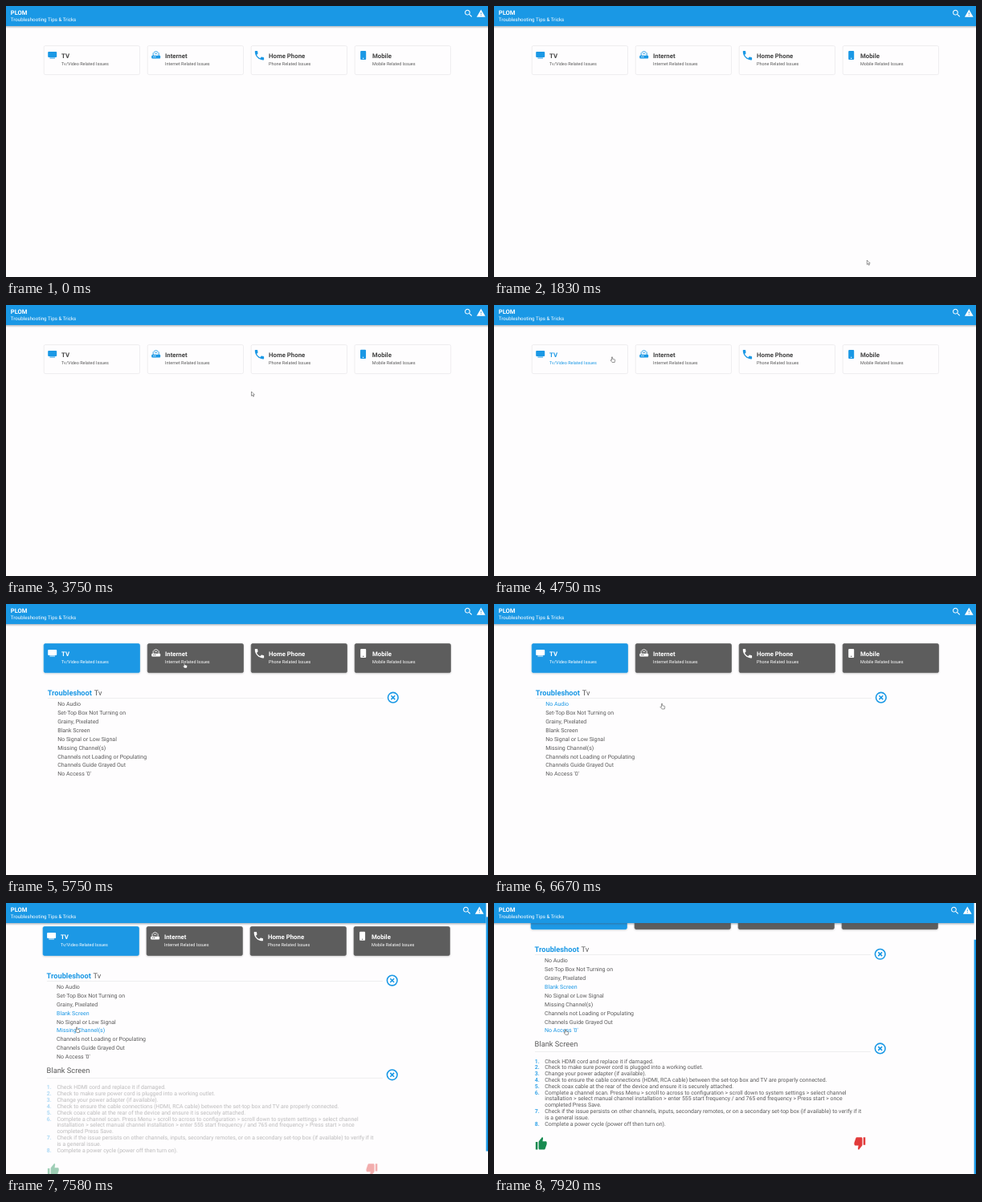
Write an HTML page that moves like this. It is 600 px wide and 338 px high and loops after 8 s.

```html
<!DOCTYPE html>
<html lang="en">
<head>
<meta charset="utf-8">
<title>Troubleshooting Tips</title>
<style>
  html, body { margin: 0; width: 100%; height: 100%; overflow: hidden; background: #fefdfe; }
  svg { display: block; width: 600px; height: 338px; }
  text { font-family: Roboto, Arial, sans-serif; text-rendering: geometricPrecision; }
</style>
</head>
<body>
<svg id="stage" viewBox="0 0 600 338">
  <defs>
    <linearGradient id="shade" x2="0" y2="1">
      <stop stop-color="#456" stop-opacity=".4"/>
      <stop offset="1" stop-color="#456" stop-opacity="0"/>
    </linearGradient>
    <filter id="lift" x="-10%" y="-20%" width="120%" height="150%">
      <feDropShadow dx="0" dy=".7" stdDeviation=".8" flood-opacity=".22"/>
    </filter>
  </defs>
</svg>
<script>
const LOOP = 8000, STEP = 1000 / 12;
const BLUE = [26, 152, 229], WHITE = [255, 255, 255], DARK = [93, 93, 93];
const INK = [68, 68, 68], SOFT = [90, 90, 90], PAPER = [254, 253, 254], EDGE = [232, 231, 234];
const OPEN = 4830, PICK = 7330, MAX_SCROLL = 53;
const CARD_W = 119.3, CARD_H = 36, CARD_Y = 49.6;

const rgb = c => `rgb(${c.map(Math.round)})`;
const mix = (a, b, p) => rgb(a.map((v, i) => v + (b[i] - v) * p));
const ramp = (t, from, to) => Math.min(1, Math.max(0, (t - from) / (to - from)));
const swing = p => 0.5 - Math.cos(Math.PI * p) / 2;

const stage = document.getElementById('stage');
function add(parent, tag, attrs = {}) {
  const el = document.createElementNS('http://www.w3.org/2000/svg', tag);
  parent.append(el);
  return set(el, attrs);
}
function set(el, attrs) {
  for (const k in attrs) el.setAttribute(k, attrs[k]);
  return el;
}
// y is the middle of the capitals
function label(parent, str, x, y, size, color, weight = 400) {
  const el = add(parent, 'text', {
    x, y: y + size * 0.355, 'font-size': size, 'font-weight': weight, fill: rgb(color)
  });
  el.textContent = str;
  return el;
}

const page = add(stage, 'g');

// Category cards
const icons = [
  g => {
    add(g, 'rect', { x: 5, y: 7.5, width: 11, height: 7, rx: 1 });
    add(g, 'rect', { x: 7, y: 14.9, width: 7, height: 1, rx: .4 });
  },
  g => {
    add(g, 'path', {
      'fill-rule': 'evenodd',
      d: 'M6 12.2h9q1 0 1 1v1.7q0 1-1 1h-9q-1 0-1-1v-1.7q0-1 1-1zM7 13.5v1h1.2v-1zM9 13.5v1h1.2v-1z'
    });
    add(g, 'path', {
      d: 'M7 12.4V8.8M14 12.4V8.8M8.8 10.3Q10.5 8.8 12.2 10.3M7.6 8.4Q10.5 5.6 13.4 8.4',
      fill: 'none', stroke: 'currentColor', 'stroke-width': .9
    });
  },
  g => add(g, 'path', {
    transform: 'translate(2.7 4.6) scale(.63)',
    d: 'M6.62 10.79c1.44 2.83 3.76 5.14 6.59 6.59l2.2-2.2c.27-.27.67-.36 1.02-.24 1.12.37 2.33.57 3.57.57.55 0 1 .45 1 1V20c0 .55-.45 1-1 1-9.39 0-17-7.61-17-17 0-.55.45-1 1-1h3.5c.55 0 1 .45 1 1 0 1.25.2 2.45.57 3.57.11.35.03.74-.25 1.02l-2.2 2.2z'
  }),
  g => add(g, 'path', {
    'fill-rule': 'evenodd',
    d: 'M8 6.3h5q1 0 1 1v9q0 1-1 1h-5q-1 0-1-1v-9q0-1 1-1zM9.9 15.2v1.1h1.2v-1.1z'
  })
];
const cards = [
  ['TV', 'Tv/Video Related Issues'],
  ['Internet', 'Internet Related Issues'],
  ['Home Phone', 'Phone Related Issues'],
  ['Mobile', 'Mobile Related Issues']
].map(([name, note], i) => {
  const x = 47.2 + i * 129;
  const g = add(page, 'g');
  const box = add(g, 'rect', { width: CARD_W, height: CARD_H, rx: 1.8, 'stroke-width': .7 });
  const icon = add(g, 'g', { fill: 'currentColor' });
  icons[i](icon);
  return {
    x, g, box, icon,
    name: label(g, name, 21.8, 12.6, 7.8, INK, 700),
    note: label(g, note, 21.8, 22.8, 5.47, SOFT)
  };
});

// Section heading rule and close button
function heading(parent, y, lineY) {
  add(parent, 'rect', { x: 52, y: lineY, width: 418, height: .6, fill: '#e4e4e6' });
  const g = add(parent, 'g', { fill: '#fff', stroke: rgb(BLUE), 'stroke-width': 1.6 });
  add(g, 'circle', { cx: 481.8, cy: y, r: 6.3 });
  add(g, 'path', { d: `M479.4 ${y - 2.4}l4.8 4.8m0-4.8l-4.8 4.8` });
}

const issueHead = add(page, 'g');
heading(issueHead, 116.7, 117.3);
label(issueHead, 'Troubleshoot', 51.7, 111, 9.25, BLUE, 700);
label(issueHead, 'Tv', 109.7, 111, 9.25, SOFT);

const ROW_Y = 124.4, ROW_H = 10.94;
const issueList = add(page, 'g');
const issues = [
  'No Audio', 'Set-Top Box Not Turning on', 'Grainy, Pixelated', 'Blank Screen',
  'No Signal or Low Signal', 'Missing Channel(s)', 'Channels not Loading or Populating',
  'Channels Guide Grayed Out', "No Access '0'"
].map((s, i) => label(issueList, s, 64.2, ROW_Y + i * ROW_H, 7, SOFT));
const CHOSEN = 3;

const fixHead = add(page, 'g');
heading(fixHead, 234.4, 238);
label(fixHead, 'Blank Screen', 51.7, 228.6, 9.3, SOFT);

const fixBody = add(page, 'g');
let line = 0;
[
  'Check HDMI cord and replace it if damaged.',
  'Check to make sure power cord is plugged into a working outlet.',
  'Change your power adapter (if available).',
  'Check to ensure the cable connections (HDMI, RCA cable) between the set-top box and TV are properly connected.',
  'Check coax cable at the rear of the device and ensure it is securely attached.',
  'Complete a channel scan. Press Menu > scroll to across to configuration > scroll down to system settings > select channel|installation > select manual channel installation > enter 555 start frequency / and 765 end frequency > Press start > once|completed Press Save.',
  'Check if the issue persists on other channels, inputs, secondary remotes, or on a secondary set-top box (if available) to verify if it|is a general issue.',
  'Complete a power cycle (power off then turn on).'
].forEach((s, i) => {
  const y = () => 250 + line * 7.81;
  label(fixBody, `${i + 1}.`, 51.8, y(), 6.95, BLUE, 500);
  for (const part of s.split('|')) {
    label(fixBody, part, 64.4, y(), 6.95, SOFT);
    line++;
  }
});
const THUMB = 'M1 21h4V9H1v12zm22-11c0-1.1-.9-2-2-2h-6.31l.95-4.57.03-.32c0-.41-.17-.79-.44-1.06L14.17 1 7.59 7.59C7.22 7.95 7 8.45 7 9v10c0 1.1.9 2 2 2h9c.83 0 1.54-.5 1.84-1.22l3.02-7.05c.09-.23.14-.47.14-.73v-2z';
add(fixBody, 'path', { d: THUMB, fill: '#178a50', transform: 'translate(52.3 344) scale(.63 .78)' });
add(fixBody, 'path', { d: THUMB, fill: '#e23b3b', transform: 'translate(464 361.6) scale(-.63 -.78)' });

// Header bar
const bar = add(stage, 'rect', { height: 25, fill: rgb(BLUE) });
const barShade = add(stage, 'rect', { y: 25, height: 3, fill: 'url(#shade)' });
label(stage, 'PLOM', 5.8, 8.2, 7.6, WHITE, 700);
label(stage, 'Troubleshooting Tips & Tricks', 5.8, 17, 6.2, WHITE);
const tools = add(stage, 'g', { fill: '#fff' });
add(tools, 'path', {
  transform: 'translate(569.5 3.2) scale(.52)',
  d: 'M15.5 14h-.79l-.28-.27C15.41 12.59 16 11.11 16 9.5 16 5.91 13.09 3 9.5 3S3 5.91 3 9.5 5.91 16 9.5 16c1.61 0 3.09-.59 4.23-1.57l.27.28v.79l5 4.99L20.49 19l-4.99-5zm-6 0C7.01 14 5 11.99 5 9.5S7.01 5 9.5 5 14 7.01 14 9.5 11.99 14 9.5 14z'
});
add(tools, 'path', {
  transform: 'translate(585.4 3.4) scale(.49)',
  d: 'M1 21h22L12 2 1 21zm12-3h-2v-2h2v2zm0-4h-2v-4h2v4z'
});
const thumb = add(stage, 'rect', { x: 597.6, width: 2.4, fill: rgb(BLUE) });

// Pointer
const pen = { fill: '#fff', stroke: '#444', 'stroke-width': .55, 'stroke-linejoin': 'round' };
const arrow = add(stage, 'path', { ...pen, d: 'M0 0V5.4L1.3 4.3 2.2 6.3 3.1 5.9 2.2 3.9H3.9Z' });
const hand = add(stage, 'path', {
  ...pen,
  d: 'M-.6 .5Q0-.4 .6 .5V2.8L3.2 3.4Q3.8 3.6 3.7 4.4L3.2 7H.1L-2 4.5Q-1.9 3.6-.6 4.5Z'
});
const route = [
  [160, 588, 331], [500, 465, 314], [667, 464.3, 314.5], [750, 464.3, 317], [2850, 464.3, 317],
  [3700, 305.5, 108], [3750, 305.5, 108], [3850, 299, 118], [4080, 240, 72], [4170, 222, 68],
  [4250, 222, 68], [4500, 150, 66], [4580, 147, 64.5], [5350, 147, 64.5], [5600, 222, 73],
  [5800, 222, 73], [6100, 350, 72], [6350, 352, 87], [6950, 89, 155], [7170, 87.8, 153.6],
  [7420, 87.8, 153.6], [7900, 89, 157.3], [LOOP, 89, 157.3]
];
function pointerAt(t) {
  const i = Math.max(1, route.findIndex(k => k[0] >= t));
  const [t0, x0, y0] = route[i - 1], [t1, x1, y1] = route[i];
  const p = swing(ramp(t, t0, t1));
  return [x0 + (x1 - x0) * p, y0 + (y1 - y0) * p];
}

function render(t) {
  const opened = ramp(t, OPEN, OPEN + 250);
  const picked = t >= PICK;
  const scroll = MAX_SCROLL * swing(ramp(t, PICK, PICK + 600));
  const shift = picked ? -1.1 : 0;
  const [px, py] = pointerAt(t);
  const mx = px - shift, my = py + scroll;
  let link = false;

  set(page, { transform: `translate(${shift} ${-scroll})` });

  cards.forEach((c, i) => {
    const p = ramp(t, 2080 + i * 190, 3280 + i * 190);
    const pulse = Math.sin(Math.PI * p) ** 2;
    const over = t > 160 && mx > c.x && mx < c.x + CARD_W && my > CARD_Y && my < CARD_Y + CARD_H;
    link = link || over;
    const back = i ? DARK : BLUE;
    const cx = CARD_W / 2, cy = CARD_H / 2;
    set(c.g, {
      transform: `translate(${c.x + cx} ${CARD_Y + cy}) scale(${1 + .05 * pulse}) translate(${-cx} ${-cy})`
    });
    set(c.box, { fill: mix(PAPER, back, opened), stroke: mix(EDGE, back, opened) });
    c.box.style.filter = pulse > .9 || opened > .5 ? 'url(#lift)' : 'none';
    c.icon.style.color = mix(BLUE, WHITE, opened);
    set(c.name, { fill: mix(over ? BLUE : INK, WHITE, opened) });
    set(c.note, { fill: mix(over ? BLUE : SOFT, WHITE, opened) });
  });

  set(issueHead, { opacity: ramp(t, 4900, 5150) });
  set(issueList, { opacity: ramp(t, 5000, 5400) });
  issues.forEach((el, i) => {
    const over = t > 5400 && mx > 52 && mx < 470 && Math.abs(my - ROW_Y - i * ROW_H) < ROW_H / 2;
    link = link || over;
    set(el, { fill: rgb(over || (picked && i === CHOSEN) ? BLUE : SOFT) });
  });
  set(fixHead, { opacity: picked ? 1 : 0 });
  set(fixBody, { opacity: ramp(t, 7430, 7800) });

  const width = picked ? 597.6 : 600;
  set(bar, { width });
  set(barShade, { width });
  set(tools, { transform: `translate(${picked ? -2 : 0} 0)` });
  const ratio = 338 / (338 + MAX_SCROLL);
  set(thumb, { y: scroll * ratio, height: picked ? 338 * ratio : 0 });

  const place = `translate(${px} ${py})`;
  set(arrow, { transform: place, opacity: t > 160 && !link ? 1 : 0 });
  set(hand, { transform: place, opacity: t > 160 && link ? 1 : 0 });
}

const start = performance.now();
function tick() {
  const t = (performance.now() - start) % LOOP;
  render(Math.floor((t + 5) / STEP) * STEP);
  requestAnimationFrame(tick);
}
tick();
</script>
</body>
</html>
```
